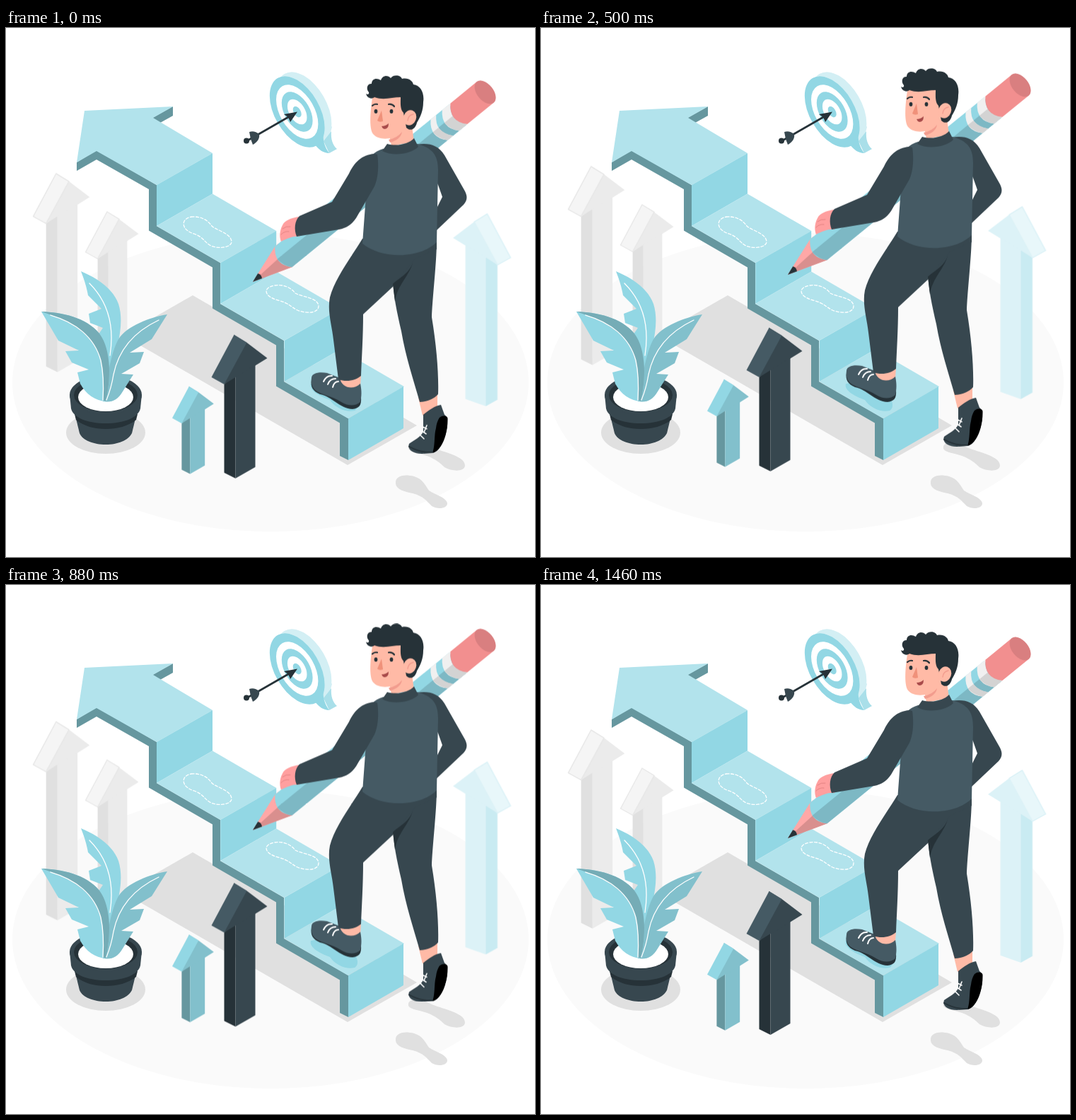
An HTML page without scripts for the animation above (1.5 s loop, 748 px wide and 748 px high).

```html
<!DOCTYPE html>
<html lang="en">
<head>
<meta charset="utf-8">
<title>Climbing the steps</title>
<style>
  html, body { margin: 0; width: 100%; height: 100%; overflow: hidden; background: #fff; }
  svg { display: block; width: 100%; height: 100%; }
  .float { animation: float 1.5s linear infinite; }
  @keyframes float {
    0%, 100% { transform: translateY(.8px); }
    50% { transform: translateY(-14.2px); }
  }

  .sky { fill: #92d7e4; }
  .pale { fill: #b2e3ec; }
  .mid { fill: #82c0cc; }
  .dusk { fill: #75acb6; }
  .deep { fill: #66979f; }
  .ink { fill: #263238; }
  .slate { fill: #37474f; }
  .steel { fill: #455a64; }
  .shade { fill: #e0e0e0; }
  .skin { fill: #ffbaa6; }
  .hand { fill: #ff9f9f; }
  .white { fill: #fff; }
  .line { fill: none; stroke-linecap: round; stroke-linejoin: round; }

  .bevel { fill: var(--bevel); stroke: var(--edge, none); stroke-width: 1.5; stroke-linejoin: round; }
  .face { fill: var(--face); }
  .side { fill: var(--side); }
  .grey { --bevel: #f5f5f5; --face: #ebebeb; --side: #e0e0e0; --edge: #e8e8e8; }
  .blue { --bevel: #92d7e4; --face: #82c0cc; --side: #66979f; }
  .dark { --bevel: #455a64; --face: #37474f; --side: #263238; }
  .glass { --bevel: #e8f7fa; --face: #dcf2f7; --side: #c9ebf2; --edge: #dcf2f7; }
</style>
</head>
<body>
<svg viewBox="0 0 748 748">
  <defs>
    <g id="head">
      <path class="face" d="M32 0 50 11 79 33 62 43.500 34 60 18 70Z"/>
      <path class="bevel" d="M32 0 50 11 18 70 0 60Z"/>
    </g>
    <g id="step">
      <path class="sky" d="M213 222 292 177V234.500L213 280Z"/>
      <path class="pale" d="M213 280 292 234.500 382.500 287 303 332Z"/>
    </g>
  </defs>

  <ellipse cx="374" cy="501" rx="365" ry="211" fill="#fafafa"/>

  <!-- ground shadows -->
  <g class="shade">
    <path d="M264 378 175 429 178 442 483 618 581 562 480 503Z"/>
    <path d="M569 592C570 585 586 585 598 591C616 600 649 604 649 619C648 628 630 627 620 621C609 610 600 606 585 602C572 599 568 597 569 592Z"/>
    <path d="M551 642C552 632 565 631 577 634C590 638 593 647 598 654C607 660 623 664 624 672C624 680 610 681 602 676C594 668 590 662 575 658C558 655 550 650 551 642Z"/>
    <ellipse cx="141" cy="572" rx="56" ry="30"/>
  </g>

  <!-- back arrows -->
  <g class="float">
    <g class="grey" transform="translate(38.500 205) scale(1.01)">
      <path class="side" d="M18 70 34 55V278L18 270Z"/>
      <path class="face" d="M34 55 62 40V262L34 278Z"/>
      <use href="#head"/>
    </g>
    <g class="grey" transform="translate(112.500 259) scale(.95)">
      <path class="side" d="M18 70 34 55V212L18 204Z"/>
      <path class="face" d="M34 55 62 40V196L34 212Z"/>
      <use href="#head"/>
    </g>
    <g class="glass" transform="translate(713.500 262) scale(-1.03 1.03)">
      <path class="side" d="M18 70 34 55V264L18 255Z"/>
      <path class="face" d="M34 55 62 40V254L34 264Z"/>
      <use href="#head"/>
    </g>
  </g>

  <!-- stairs -->
  <path class="deep" d="M100 190 128 173 213 222V280L303 332V390L393 442V500L484 552V611L472 605V558.500L382 506.500V448.500L292 396.500V338.500L202 286.500V228L128 186 100 202Z"/>
  <path class="deep" d="M236 111V124L218 134 207 127Z"/>
  <path class="pale" d="M111 117 236 111 208 127 292 177 213 222 128 174 100 190Z"/>
  <use href="#step"/>
  <use href="#step" x="90.200" y="110"/>
  <use href="#step" x="180.500" y="220"/>
  <path class="sky" d="M484 552 562 507V566L484 611Z"/>
  <g class="line" stroke="#fff" stroke-width="1.300" stroke-dasharray="4 2.500">
    <path d="M262 267C275 266 285 271 291 280C297 286 318 290 319 302C319 310 302 313 290 308C280 303 280 296 266 291C248 286 246 270 262 267Z"/>
    <path d="M380 364C392 362 403 367 409 375C420 381 441 381 442 393C442 404 424 404 412 399C402 394 402 390 385 385C365 380 362 367 380 364Z"/>
  </g>
  <path class="sky" d="M431 503C428 513 445 521 458 526C466 538 482 544 493 541C500 537 498 525 488 518L450 500Z"/>

  <!-- target -->
  <g fill="#d3eff4">
    <ellipse cx="421.500" cy="112.500" rx="55" ry="31.700" transform="rotate(60 421.500 112.500)"/>
    <path d="M393 71 404 65 461 140 455 162 430 160Z"/>
    <path fill="#a9dfe9" d="M449 160 460 146C459 157 462 166 468 171L457 177Z"/>
  </g>
  <path class="sky" d="M449 145C447 158 451 169 457 177C449 177 442 172 437 165Z"/>
  <g transform="translate(411.700 118.500) rotate(60) scale(1 .577)">
    <circle class="sky" r="55"/>
    <circle class="white" r="42"/>
    <circle class="sky" r="31"/>
    <circle class="white" r="19.500"/>
    <circle class="sky" r="8.500"/>
  </g>
  <g class="ink">
    <path class="line" d="M340 160 407 121.500" stroke="#263238" stroke-width="2.600"/>
    <path d="M412 118.500 393 122 399 126 402 133Z"/>
    <path class="slate" d="M344 147C349 145 354 147 358 150C359 156 356 161 349 165L346 157Z"/>
    <circle cx="340" cy="159.500" r="4"/>
  </g>

  <!-- plant -->
  <path class="slate" d="M96 540 104 573C108 583 124 589 141 589S173 583 178 573L186 540Z"/>
  <path class="ink" d="M97 546 99 554C110 563 125 567 141 567S173 563 184 554L186 546Z"/>
  <path class="slate" d="M90 518 92 538C95 551 115 559 141 559S187 551 190 538L192 518Z"/>
  <ellipse class="slate" cx="141" cy="519" rx="51" ry="28"/>
  <ellipse class="ink" cx="141" cy="519" rx="45" ry="23.500"/>
  <ellipse class="white" cx="141" cy="522" rx="39" ry="20"/>
  <path class="sky" d="M106 344C125 352 150 366 159 390C165 409 162 430 158 448C153 472 150 500 147 525L136 500 126 440 137 424 119 417 117 404 135 397 116 378C114 366 110 354 106 344Z"/>
  <path class="mid" d="M228 405C204 409 171 421 159 440C147 462 144 495 137 528C150 530 158 526 165 514L180 490 163 489 189 474 195 458 175 459 206 440Z"/>
  <path class="sky" d="M50 401C79 402 113 409 132 432C150 456 148 500 141 528C126 527 113 518 105 503L101 487 117 483 93 473 84 457 103 456 74 442Z"/>
  <path class="dusk" d="M50 401C79 402 113 409 132 432C150 456 148 500 141 528L137 526Q139 493 134 470C125 437 98 416 50 401Z"/>
  <g class="line" stroke="#fff" stroke-width="1.300">
    <path d="M118 361C143 386 154 419 147 463"/>
    <path d="M216 413C180 430 159 456 152 490Q149 509 142 526"/>
    <path d="M63 406C98 416 125 437 134 470Q139 493 137 526"/>
  </g>

  <!-- front arrows -->
  <g class="float">
    <g class="blue" transform="translate(235 506) scale(.745)">
      <path class="side" d="M18 70 34 55V166L18 158Z"/>
      <path class="face" d="M34 55 62 40V150L34 166Z"/>
      <use href="#head"/>
    </g>
    <g class="dark" transform="translate(290.500 433)">
      <path class="side" d="M18 70 34 55V203L18 195Z"/>
      <path class="face" d="M34 55 62 40V187L34 203Z"/>
      <use href="#head"/>
    </g>
  </g>

  <!-- climber -->
  <g class="float">
    <g transform="translate(349 358) rotate(-39.200)">
      <path fill="#ffa8a7" d="M0 0 56-19H62V19H56Z"/>
      <path fill="#d98f8e" d="M0 0 56-3V19Z"/>
      <path class="ink" d="M0 0 13-4.600Q16 0 13 4.600Z"/>
      <path class="sky" d="M56-19H374V19H56Q38 0 56-19Z"/>
      <path fill="#7db8c4" d="M47-3H374V19H56Q48 10 47-3Z"/>
      <path fill="#f0f0f0" d="M340-19H350Q332 0 350 19H340Q322 0 340-19ZM361-19H376Q358 0 376 19H361Q343 0 361-19Z"/>
      <path fill="#d3d3d3" d="M331-3H341Q342 10 350 19H340Q332 10 331-3ZM352-3H367Q368 10 376 19H361Q353 10 352-3Z"/>
      <path fill="#f28f8f" d="M376-19H424A11 19 0 0 1 424 19H376Q358 0 376-19Z"/>
      <ellipse fill="#d97f80" cx="424" rx="11.500" ry="19"/>
    </g>

    <!-- back leg -->
    <path class="skin" d="M583 522 589 547 610 537 610 515Z"/>
    <path class="slate" d="M547 350C547 375 553 402 559 428C565 464 576 496 585 528C594 528 605 524 611 517C612 490 609 450 602 408C603 380 609 330 609 300L550 310Z"/>
    <path class="slate" d="M590 546C597 540 607 533 615 532L620 546C625 549 625 560 622 572C618 586 612 598 604 600L588 601C575 601 567 595 570 587C577 582 586 578 590 570Z"/>
    <path d="M613 550C618 546 624 547 624.500 551C625 570 618 596 603 600C607 590 605 576 608 565Q609 556 613 550Z"/>
    <path class="line" stroke="#263238" stroke-width="2" d="M570 591Q586 600 603 599"/>
    <path class="line" stroke="#fff" stroke-width="1.600" d="M589 563 595 566M588 569 594 573M586 575 591 580M595 561 591 571"/>

    <!-- front leg -->
    <path class="skin" d="M471 490V506C480 515 495 513 501 506L502 488Z"/>
    <path class="ink" d="M432 497C430 506 434 513 444 517C461 520 471 537 490 538C499 537 503 533 502 521L480 512Z"/>
    <path class="steel" d="M432 494C432 487 443 485 454 487L472 494C474 508 491 512 501 502C503 512 503 519 501 528C494 534 484 534 474 528C460 519 445 518 437 511C432 506 431 500 432 494Z"/>
    <path class="line" stroke="#fff" stroke-width="2" d="M449 499Q453 490 461 491M455 503Q458 495 466 495M462 507Q464 499 470 499"/>
    <path class="slate" d="M504 297C489 322 465 353 458 380C454 400 461 420 463 440L470 496C481 500 494 498 502 491C503 465 505 435 505 404L547 365 578 326 609 312V300Z"/>
    <path class="ink" d="M576 328C572 346 555 353 547 361L550 386C553 362 571 350 576 328Z"/>

    <!-- right arm, torso -->
    <path class="slate" d="M580 164C597 161 611 164 620 179L649 230C653 238 652 243 647 249L609 285V254L617 238 611 221 600 200Z"/>
    <path class="skin" d="M541 145 545 166 577 160 573 130Z"/>
    <path class="steel" d="M533 170C520 174 512 182 512 196L504 304C530 326 585 326 609 302L611 200C611 180 604 169 582 163Z"/>
    <path class="slate" d="M532 173 539 163C553 167 570 163 577 155L583 167C572 178 547 181 532 173Z"/>

    <!-- left hand and arm -->
    <path class="hand" d="M414 266C403 268 394 271 391 278C386 287 387 296 389 301C398 297 406 293 415 294Z"/>
    <path class="line" stroke="#e58484" d="M391 283Q396 279 402 280M389 291Q394 286 400 287"/>
    <path class="slate" d="M521 177C503 178 492 190 485 205L461 245 415 265C408 272 407 284 411 294L471 284C481 282 488 278 495 268L521 223C527 210 527 191 525 178Z"/>

    <!-- head -->
    <path class="skin" d="M519 92C515 115 513 141 519 149C527 159 549 157 555 148L575 135 578 90Z"/>
    <path fill="#f29c8e" d="M541 157Q553 155 560 146Q558 157 543 161Z"/>
    <path class="ink" d="M509 92C511 94 514 93 513 90C508 84 512 77 517 78C517 71 524 69 530 73C532 66 540 65 544 70C549 64 558 66 560 71C569 69 575 74 576 79C586 80 592 91 590 104C590 116 586 125 581 133C579 142 572 146 566 140L562 119C557 114 558 105 558 97C546 97 534 102 521 97C516 101 510 97 509 92Z"/>
    <ellipse class="skin" cx="571" cy="126" rx="9" ry="11" transform="rotate(20 571 126)"/>
    <path class="line" stroke="#f29c8e" stroke-width="1.300" d="M568 130Q569 122 576 121"/>
    <path fill="#f0917a" d="M531 116 525 130Q528 133 533 131Z"/>
    <ellipse class="ink" cx="523" cy="117" rx="2.400" ry="3"/>
    <ellipse class="ink" cx="545" cy="117" rx="2.400" ry="3"/>
    <path class="line" stroke="#263238" stroke-width="2.200" d="M518 109Q521 106 525 107M541 107Q546 106 549 110"/>
    <path fill="#a84a4a" d="M531 138Q537 138 541 134Q541 142 535 142Q532 141 531 138Z"/>
  </g>
</svg>
</body>
</html>
```
